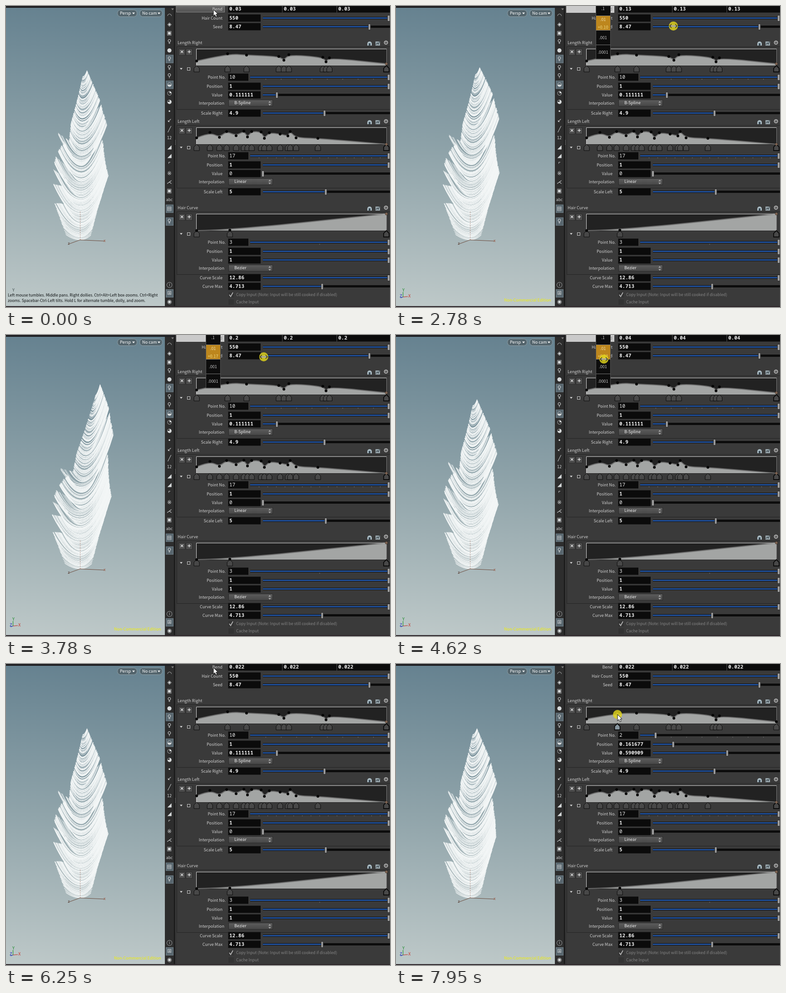
These frames come from a looping animation (846x662 px, 8000 ms). An HTML page with a canvas:

```html
<!DOCTYPE html>
<html lang="en">
<head>
<meta charset="utf-8">
<title>Feather bend</title>
<style>
html, body { margin: 0; height: 100%; overflow: hidden; background: #3a3a3a; }
canvas { display: block; }
</style>
</head>
<body>
<canvas id="stage" width="846" height="662"></canvas>
<script>
const c = document.getElementById('stage').getContext('2d');
const SANS = '"Noto Sans CJK JP", "Noto Sans", sans-serif';
const MONO = '"Noto Sans Mono", "DejaVu Sans Mono", monospace';
const SYMBOL = '"DejaVu Sans", sans-serif';
const LABEL = '9.2px ' + SANS;

// ---- drawing helpers ----
function rect(x, y, w, h, fill) { c.fillStyle = fill; c.fillRect(x, y, w, h); }
function frame(x, y, w, h, color) { c.strokeStyle = color; c.lineWidth = 1; c.strokeRect(x + .5, y + .5, w - 1, h - 1); }
function path(x, y, ...offsets) {
  c.beginPath();
  for (let i = 0; i < offsets.length; i += 2) c.lineTo(x + offsets[i], y + offsets[i + 1]);
}
function stroke(color, width = 1) { c.strokeStyle = color; c.lineWidth = width; c.stroke(); }
function fill(color) { c.fillStyle = color; c.fill(); }
function line(color, width, ...points) { path(0, 0, ...points); stroke(color, width); }
function triangle(x, y, color, up = 1) { path(x, y, -3, -1.5 * up, 3, -1.5 * up, 0, 2 * up); fill(color); }
function dot(x, y, r, color) { c.beginPath(); c.arc(x, y, r, 0, 7); fill(color); }
function text(s, x, y, color = '#cfcfcf', font = LABEL, align = 'left') {
  c.font = font; c.fillStyle = color; c.textAlign = align; c.textBaseline = 'middle';
  c.fillText(s, x, y);
}
function vertical(y0, y1, ...colors) {
  const g = c.createLinearGradient(0, y0, 0, y1);
  colors.forEach((color, i) => g.addColorStop(i / (colors.length - 1), color));
  return g;
}
// Rows are [key, ...values]; returns the values interpolated at k.
function sample(rows, k) {
  let i = 1;
  while (i < rows.length - 1 && rows[i][0] < k) i++;
  const a = rows[i - 1], b = rows[i];
  const f = Math.min(1, Math.max(0, (k - a[0]) / (b[0] - a[0])));
  return a.slice(1).map((v, j) => v + (b[j + 1] - v) * f);
}

// ---- ramps: [position, value]; they shape both the panel and the feather ----
const rightRamp = trim => [[0, .27], [.163 - .001323 * trim, .7 - .109091 * trim], [.263, .62], [.433, .54], [.46, .32],
  [.486, .65], [.665, .49], [.682, .22], [.7, .46], [1, 1 / 9]];
const LEFT_RAMP = [[0, .38], [.07, .7], [.12, .41], [.158, .76], [.208, .51], [.249, .78], [.268, .43], [.29, .76], [.34, .73],
  [.357, .35], [.383, .68], [.44, .6], [.481, .49], [.493, .76], [.524, .38], [.639, .35], [1, 0]];
const CURVE_RAMP = [[0, 0], [.175, .03], [1, 1]];

// ---- feather ----
let seed = 847;
const random = () => (seed = seed * 16807 % 2147483647) / 2147483647;
const hairs = Array.from({ length: 550 }, () => ({ h: random(), size: 1 - .04 * random() }));

function drawFeather(bend, trim) {
  const q = (bend - .03) / .17, right = rightRamp(trim / 2);
  c.beginPath();
  for (const { h, size } of hairs) {
    const linear = .4 * (1 - h ** 3), e = linear * q + (1 - linear) * q ** 3;
    const x = 164 + 5 * h + 28 * e * h ** 1.5, y = 515 - 360 * h - 22 * e * h ** 1.5;
    const shear = .95 * h * e, rise = 1 - .7 * Math.exp(-25 * h), stretch = size * (1 + .08 * e);
    const strand = (dx, lift) => {
      c.moveTo(x, y);
      c.quadraticCurveTo(x + dx / 2, y - shear * dx / 2, x + dx, y - shear * dx - lift * rise);
    };
    const leftLength = 85 * (1 - .27 * h) * sample(LEFT_RAMP, h)[0] * stretch;
    const rightLength = 87 * sample(right, h)[0] * stretch;
    strand(-leftLength, 1.1 * leftLength);
    strand(rightLength, 1.4 * rightLength);
  }
  stroke('#f3f6f7', .9);
}

function pill(x, w, label) {
  c.beginPath(); c.roundRect(x + .5, 8.5, w, 15, 7);
  fill('#53646c'); stroke('#8fa0a7');
  text(label, x + 6, 15.5, '#fff');
  triangle(x + w - 7, 16, '#fff');
}

function drawViewport(t, bend, trim) {
  rect(0, 0, 350, 662, vertical(4, 660, '#668290', '#90a4aa', '#bdc8c8'));
  rect(0, 0, 372, 4, '#202124');
  pill(245, 43, 'Persp');
  pill(294, 50, 'No cam');
  drawFeather(bend, trim);
  c.setLineDash([3, 2]);
  line('rgba(150,90,70,.55)', 1, 163.5, 515, 163.5, 452);
  c.setLineDash([]);
  line('#6b4a3c', 1, 137, 524, 163, 514.5, 217, 517);
  text('x', 215, 516, '#9c5a44');
  text('z', 136, 522, '#5c4a44');
  if (t < 1940) {
    const font = '8.6px ' + SANS;
    text('Y', 14, 625, '#40504f');
    text('Left mouse tumbles. Middle pans. Right dollies. Ctrl+Alt+Left box-zooms. Ctrl+Right', 4, 635.5, '#0c0f10', font);
    text('zooms. Spacebar-Ctrl-Left tilts. Hold L for alternate tumble, dolly, and zoom.', 4, 648, '#0c0f10', font);
  } else {
    line('#2b9a3a', 1.2, 15.5, 640, 15.5, 629);
    line('#c03028', 1.2, 15.5, 640, 26, 639);
    line('#2038b0', 1.2, 15.5, 640, 10, 642);
    text('Y', 14, 625, '#188a28');
    text('X', 27, 638, '#c83028');
    text('Z', 8, 638, '#1830b8');
    text('Non-Commercial Edition', 238, 647, '#f2f000', '9px ' + SANS);
  }
}

// ---- tool strip: a star marks an active tool ----
function toolColumn(glyphs, y0, step) {
  glyphs.split(' ').forEach((name, i) => {
    const y = y0 + step * i, glyph = name.replace('*', '');
    if (name != glyph) { rect(352, y - 9, 17, 18, '#58666e'); frame(352, y - 9, 17, 18, '#6f7f88'); }
    text(glyph, 360, y, '#d6d9da', (glyph.length > 1 ? '8px ' : '12px ') + SYMBOL, 'center');
  });
}
function drawTools() {
  rect(350, 4, 22, 658, '#2d2d2d');
  rect(370, 0, 2, 662, '#161616');
  rect(372, 0, 3, 662, '#333');
  triangle(367, 7, '#888');
  toolColumn('◠ ◈ ▣ ♀ ● ♀* ♀ ⚲ ◒* ◔ ◕', 22, 18.9);
  toolColumn('• ↙ ╱ 12 ◢ ◢ ⌜ ※ ⋌ ▣ abc ▤*', 233, 19.35);
  toolColumn('♀*', 474, 0);
  toolColumn('ⓘ ⊞* ◉', 613, 19);
  for (let y = 295; y < 306; y += 3) rect(372, y, 2, 1, '#777');
}

// ---- parameter panel ----
function field(x, y, w, value, bold = true) {
  rect(x - 1, y - 9, w + 1, 17, '#252525');
  rect(x, y - 8, w, 15, '#0b0b0b');
  text(value, x + 2, y, '#eee', (bold ? 'bold ' : '') + '11px ' + MONO);
}
// f is the handle's place between 0 and 1; ticks > 0 makes an index slider.
function slider(label, y, value, f, ticks = 0) {
  const x0 = ticks ? 538 : 566, x1 = 843, at = x0 + (x1 - x0) * f, top = Math.round(y) - 3;
  text(label, ticks ? 484 : 477, y, undefined, undefined, 'right');
  field(490, Math.round(y), ticks ? 44 : 71, value, !ticks && value != '0');
  rect(x0, top, 846 - x0, 5, '#0c0c0c');
  rect(x0, top + 1, at - x0, 3, '#21519c');
  for (let i = 1; i < ticks; i++) rect(x0 + (x1 - x0) * i / ticks, top + 6, 1, 2, '#777');
  rect(at - 2, top - 4, 4, 13, '#a0a0a0');
  frame(at - 3, top - 4, 6, 14, '#303030');
}
function dropdown(y, value) {
  text('Interpolation', 481, y, undefined, undefined, 'right');
  rect(490, y - 8, 98, 15, vertical(y - 8, y + 7, '#5d5d5d', '#464646'));
  frame(490, y - 8, 98, 15, '#2b2b2b');
  text(value, 503, y - 1, '#eee');
  triangle(581, y + 3, '#aaa');
  triangle(581, y - 3, '#aaa', -1);
}
function headerIcons(y) {
  c.beginPath(); c.roundRect(796, y - 4, 10, 9, [5, 5, 0, 0]); fill('#a9bac2');
  rect(799, y, 4, 5, '#3d4d58');
  rect(814, y - 4, 10, 9, '#9aa7ad');
  line('#2e3a42', 1.2, 815, y + 3, 818, y - 1, 820, y + 2, 823, y - 4);
  text('⚙', 837, y, '#ddd', '13px ' + SYMBOL, 'center');
}
function button(x, y, s) {
  rect(x, y, 15, 15, '#4d4d4d'); frame(x, y, 15, 15, '#2a2a2a');
  text(s, x + 7.5, y + 7.5, '#eee', 'bold 11px ' + SYMBOL, 'center');
}
function rampPlot(y, ramp, picked, active) {
  const base = y + 50, top = y + 13;
  const points = ramp.map(([p, v]) => [420 + 418 * p, base - 37 * v]);
  rect(419, top, 420, 38, '#222');
  const curve = () => {
    c.beginPath(); c.moveTo(...points[0]);
    for (let i = 1; i < points.length - 1; i++) {
      const [x, py] = points[i], [nx, ny] = points[i + 1];
      c.quadraticCurveTo(x, py, (x + nx) / 2, (py + ny) / 2);
    }
    c.lineTo(...points[points.length - 1]);
  };
  curve(); c.lineTo(838, base); c.lineTo(420, base); fill('#a3a5a4');
  curve(); stroke('#6e6e6e', 2);
  line('#d8d8d8', 1, 419.5, base, 419.5, top + .5, 838.5, top + .5);
  line('#777', 1, 838.5, top, 838.5, base);
  points.forEach(([x, py], i) => {
    const on = i == picked;
    path(x, base, 0, 0, 6, 6, 6, 14, -6, 14, -6, 6); c.closePath();
    fill(on && active ? '#8796a0' : '#484848');
    stroke('#0a0a0a', on ? 1.8 : 1);
    dot(x, py, 3, '#050505');
    if (on) { dot(x, py, 2.5, '#b08a70'); dot(x, py, 1.5, '#5b4a40'); }
  });
}
function rampGroup(title, y, ramp, interpolation, { picked = ramp.length - 1, listed = picked, active = false } = {}) {
  const [position, value] = ramp[listed], last = ramp.length - 1;
  const show = n => String(+n.toFixed(6));
  text(title, 378, y);
  headerIcons(y + 1);
  frame(376, y + 8, 480, 139, '#242424');
  button(380, y + 13, '×');
  button(396, y + 13, '+');
  triangle(386, y + 57, '#ddd');
  frame(399, y + 54, 7, 7, '#ccc');
  rampPlot(y, ramp, picked, active);
  slider('Point No.', y + 76, String(listed + 1), listed / last, last);
  slider('Position', y + 95.5, show(position), position);
  slider('Value', y + 114.7, show(value), value);
  dropdown(y + 133, interpolation);
}
function checkbox(y, label, checked) {
  rect(490, y - 6, 12, 12, '#333');
  if (checked) line('#b5b5b5', 1.8, 492, y, 495, y + 4, 500, y - 5);
  text(label, 507, y, '#858585', '8.9px ' + SANS);
}

function drawPanel(t, bend, trim) {
  rect(375, 0, 471, 662, '#3a3a3a');
  const open = isDragging(t);
  if (open) rect(375, 0, 106, 15, '#cacaca');
  else if (t < 630 || (t > 6310 && t < 6480)) {
    rect(375, 0, 106, 14, vertical(0, 14, '#696969', '#515151'));
    frame(375, -1, 107, 15, '#888');
  }
  text('Bend', 477, 7, open ? '#888' : undefined, undefined, 'right');
  for (let x = 490; x < 846; x += 120) field(x, 7, 118, String(+bend.toFixed(3)));
  slider('Hair Count', 27, '550', 1);
  slider('Seed', 46, '8.47', .847);

  const pick = t < 7650 ? {} : { picked: 1, listed: t < 7800 ? 9 : 1, active: true };
  rampGroup('Length Right', 81, rightRamp(trim), 'B-Spline', pick);
  slider('Scale Right', 236, '4.9', .49);
  rampGroup('Length Left', 254, LEFT_RAMP, 'Linear');
  slider('Scale Left', 409, '5', .5);
  rampGroup('Hair Curve', 444, CURVE_RAMP, 'Bezier');
  slider('Curve Scale', 598, '12.86', 1);
  slider('Curve Max', 617, '4.713', .4713);
  checkbox(635, 'Copy Input (Note: Input will be still cooked if disabled)', true);
  checkbox(651, 'Cache Input');
}

function drawLadder(step, bend) {
  rect(440, 0, 33, 117, '#0d0d0d');
  frame(440, -1, 33, 118, '#555');
  ['.1', '.01', '.001', '.0001'].forEach((label, i) => {
    const y = 32 * i - 10, on = i == step;
    if (on) rect(441, y, 31, 32, '#bd861d');
    text(label, 456, y + (on && i ? 8 : 16), on ? '#eedfae' : '#c9c9c9', LABEL, 'center');
    if (on && i) {
      const delta = +(bend - .03).toFixed(3);
      text(delta ? (delta > 0 ? '+' : '') + delta.toFixed(i + 1) .slice(0, 6) : '0', 456, y + 25, '#f2dc80', LABEL, 'center');
    }
    rect(441, y + 31, 31, 1, '#777');
  });
}

function drawCursor(t, x, y) {
  if (isDragging(t) || t >= 7650) dot(x, y, 10, 'rgba(226,214,28,.82)');
  if (isDragging(t)) {
    line('#fff', 3, x - 7, y, x + 7, y);
    line('#222', 1.1, x - 8, y, x + 8, y);
    for (const s of [-1, 1]) line('#222', 1.1, x + 4 * s, y - 4, x + 8 * s, y, x + 4 * s, y + 4);
  } else {
    path(x, y, 0, 0, 0, 14, 3, 11, 5.5, 16, 8, 15, 5.7, 10, 10, 10); c.closePath();
    fill('#fff'); stroke('#111');
  }
}

// ---- motion: [ms, x, y] ----
const DRAG = [[1390, 457, 13], [1780, 457, 36], [1860, 457, 36], [2780, 611, 44], [3090, 643, 45], [3350, 643, 45],
  [3780, 568, 48], [4280, 467, 51], [4620, 458, 53], [4930, 457, 53], [5100, 457, 70], [5350, 449, 70]];
const PICK = [[6290, 457, 8], [7020, 473, 109], [7330, 489, 106], [7720, 489, 106], [7950, 488, 111]];
const LAG = 330;
const isDragging = t => t >= 630 && t < 5700;

function draw() {
  const t = performance.now() % 8000;
  const [x, y] = sample(isDragging(t) ? DRAG : PICK, t);
  const step = Math.floor((y + 10) / 32);
  // One pixel of drag is worth .001; the scene follows the pointer with a delay.
  const grid = isDragging(t) && step == 1 ? 100 : 1000;
  const bend = Math.round((.03 + (sample(DRAG, t - LAG)[0] - 457) / 1000) * grid) / grid;
  const [trim] = sample([[7720, 0], [7950, 1]], t);
  drawViewport(t, bend, trim);
  drawTools();
  drawPanel(t, bend, trim);
  rect(0, 660, 846, 2, '#2c2428');
  if (isDragging(t)) drawLadder(step, bend);
  drawCursor(t, x, y);
  requestAnimationFrame(draw);
}
draw();
</script>
</body>
</html>
```
